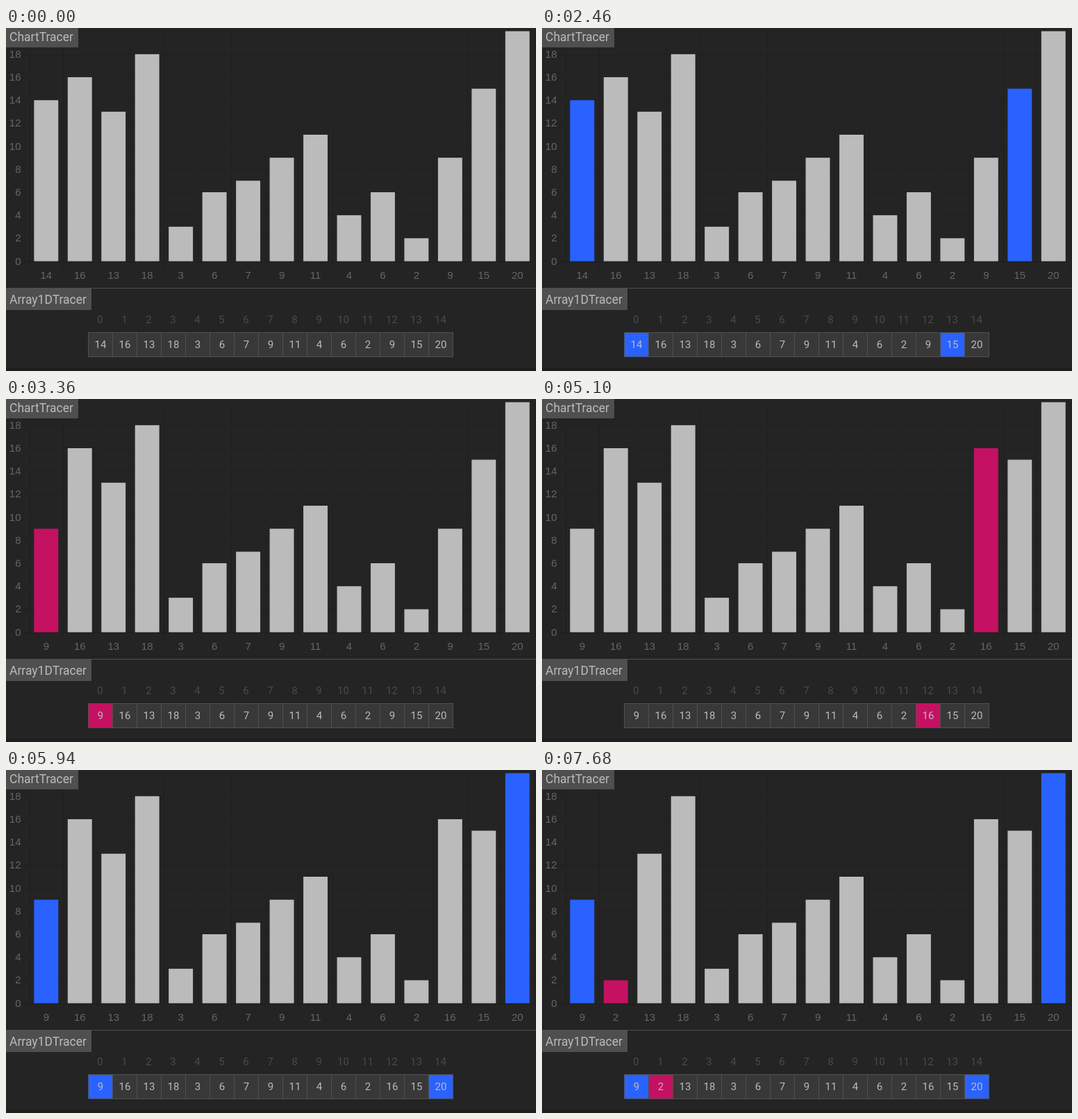
An HTML page for the animation above (8000 ms loop, 763 px wide and 495 px high).

```html
<!DOCTYPE html>
<html lang="en">
<head>
<meta charset="utf-8">
<title>Sorting tracer</title>
<style>
html, body { margin: 0; width: 100%; height: 100%; overflow: hidden; background: #242424; }
svg { display: block; width: 763px; height: 495px; }
.axis { font: 15px "Liberation Sans", Arial, sans-serif; fill: #666; }
.cell { font: 15px Roboto, sans-serif; fill: #bbb; }
.index { font: 15px Roboto, sans-serif; fill: #4a4a4a; }
.title { font: 17.5px Roboto, sans-serif; fill: #bbb; }
.mid { text-anchor: middle; }
.end { text-anchor: end; }
</style>
</head>
<body>
<svg id="stage" viewBox="0 0 763 495"></svg>
<script>
const LOOP = 8000;
const START = [14, 16, 13, 18, 3, 6, 7, 9, 11, 4, 6, 2, 9, 15, 20];
const GREY = '#bbb', CELL = '#383838', BLUE = '#2962ff', PINK = '#c51162';

// Chart and array geometry
const LEFT = 33.6, STEP = 48.46, BAR = 34.9, BASE = 336.6, UNIT = 16.6;
const ARRAY_X = 118, ARRAY_Y = 439, SIZE = 35;

// Each step: start time, selected positions, optional patch [position, value]
const STEPS = [
  { at: 0, select: [] },
  { at: 780, select: [0, 14] },
  { at: 2460, select: [0, 13] },
  { at: 3360, select: [], patch: [0, 9] },
  { at: 4200, select: [0] },
  { at: 5100, select: [], patch: [12, 16] },
  { at: 5940, select: [0, 14] },
  { at: 6840, select: [0, 12, 14] },
  { at: 7680, select: [0, 14], patch: [1, 2] }
];

const stage = document.getElementById('stage');

function add(tag, attrs, content) {
  const el = document.createElementNS('http://www.w3.org/2000/svg', tag);
  for (const key in attrs) el.setAttribute(key, attrs[key]);
  if (content !== undefined) el.textContent = content;
  return stage.appendChild(el);
}
const rect = (x, y, width, height, fill) => add('rect', { x, y, width, height, fill });
const text = (x, y, cls, content) => add('text', { x, y, class: cls }, content);

rect(0, 0, 763, 495, '#242424');
rect(0, 490, 763, 5, '#211e1f');

// Grid and value axis
for (let v = 0; v <= 20; v += 2) {
  const y = Math.round(BASE - v * UNIT);
  rect(23, y, 738, 1, v ? '#202020' : '#1d1d1d');
  if (v < 20) text(21.5, y + 4.5, 'axis end', v);
}
for (let i = 0; i <= START.length; i++) {
  rect(Math.round(LEFT + i * STEP), 4, 1, 345, i ? '#202020' : '#1d1d1d');
}

const bars = START.map((v, i) => {
  const mid = LEFT + (i + 0.5) * STEP;
  return {
    box: rect(mid - BAR / 2, 0, BAR, 0, GREY),
    label: text(mid, 362, 'axis mid')
  };
});

// Array table
rect(ARRAY_X, ARRAY_Y, SIZE * START.length + 1, SIZE + 1, '#505050');
const cells = START.map((v, i) => {
  const x = ARRAY_X + i * SIZE;
  text(x + 17.5, 426, 'index mid', i);
  return {
    box: rect(x + 1, ARRAY_Y + 1, SIZE - 1, SIZE - 1, CELL),
    label: text(x + 18, 462, 'cell mid')
  };
});

// Panel divider and titles
rect(0, 375, 763, 1, '#505050');
rect(0, 0, 104, 28, '#4f4f4f');
text(5, 19, 'title', 'ChartTracer');
rect(0, 376, 123, 31, '#4f4f4f');
text(5, 398, 'title', 'Array1DTracer');

function draw(time) {
  const values = START.slice();
  let step;
  for (const s of STEPS) {
    if (s.at > time) break;
    step = s;
    if (s.patch) values[s.patch[0]] = s.patch[1];
  }
  values.forEach((v, i) => {
    const patched = step.patch && step.patch[0] === i;
    const mark = patched ? PINK : step.select.includes(i) ? BLUE : null;
    const { box, label } = bars[i];
    box.setAttribute('y', BASE - v * UNIT);
    box.setAttribute('height', v * UNIT);
    box.setAttribute('fill', mark || GREY);
    label.textContent = v;
    cells[i].box.setAttribute('fill', mark || CELL);
    cells[i].label.textContent = v;
  });
}

const begin = performance.now();
function tick() {
  draw((performance.now() - begin) % LOOP);
  requestAnimationFrame(tick);
}
tick();
</script>
</body>
</html>
```
